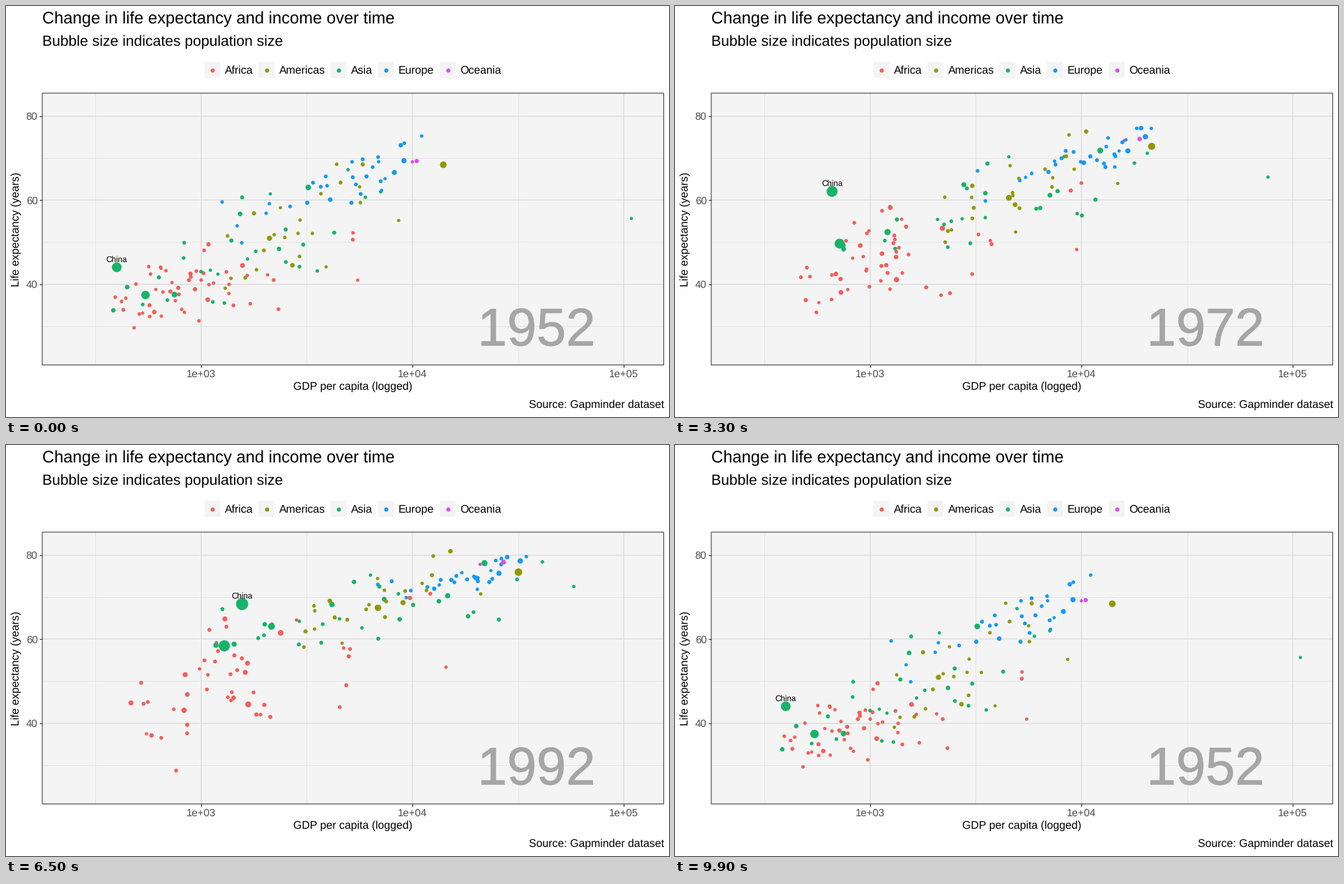
Animation of 951 by 589 pixels, one loop 10000 ms. Source, as a matplotlib script:

```python
import matplotlib.pyplot as plt
import numpy as np
from matplotlib.animation import FuncAnimation
from matplotlib.patches import Rectangle
from matplotlib.patheffects import withStroke

W, H, DPI = 951, 589, 100
PT = 72 / DPI
FRAMES, INTERVAL = 100, 100
plt.rcParams["font.family"] = "Liberation Sans"
plt.rcParams["text.hinting"] = "none"

COLORS = {
    "Africa": "#f35e5a",
    "Americas": "#929705",
    "Asia": "#17b369",
    "Europe": "#149af4",
    "Oceania": "#dc4cf0",
}
PANEL, GREY = "#f4f4f4", "#a6a6a6"

YEARS = np.arange(1952, 2008, 5)
S = np.linspace(0, 1, len(YEARS))
# Frame at which each year is reached; the last entry returns to 1952.
STOPS = (0, 8, 17, 26, 35, 44, 52, 59, 67, 75, 83, 91, 99)

# count, typical population (millions) and its growth, skew, correlation, then
# first and last: mean log10 GDP, its spread, mean life, its spread
CROWD = {
    "Africa": (49, 3, 3.3, .2, .5, (2.99, 3.27), (.28, .37), (39.3, 55), (5, 9)),
    "Americas": (23, 4, 2.7, 0, .65, (3.46, 3.92), (.23, .26), (53, 73.6), (8.5, 3.8)),
    "Asia": (28, 5, 3, 0, .65, (3.2, 3.92), (.33, .44), (47.5, 71.8), (8.5, 5)),
    "Europe": (30, 8, 1.3, -.2, .88, (3.66, 4.37), (.25, .22), (64.4, 77.7), (6, 2.6)),
    "Oceania": (2, 4, 2.2, 0, .9, (4.01, 4.47), (.01, .05), (69.2, 80.7), (.2, .5)),
}

# continent, first and last: population, GDP, life; easing power of the GDP
LANDMARKS = (
    ("Asia", (372, 1110), (547, 2452), (37.4, 64.7), 1.6),
    ("Asia", (86, 127), (3217, 31656), (63, 82.6), .5),
    ("Asia", (82, 224), (750, 3541), (37.5, 70.7), 1.1),
    ("Asia", (.2, 2.5), (108382, 47307), (55.6, 77.6), .8),
    ("Americas", (158, 301), (13990, 42952), (68.4, 78.2), .9),
    ("Americas", (57, 190), (2109, 9066), (50.9, 72.4), .6),
    ("Africa", (33, 135), (1077, 2014), (36.3, 46.9), 1),
    ("Africa", (14, 65), (781, 278), (39.1, 46.5), 2),
)

# Two countries with sudden turns: (year, GDP, life)
RWANDA = ((1952, 493, 40), (1987, 848, 44), (1992, 737, 23.6), (1997, 590, 36), (2007, 863, 46))
CHINA = ((1952, 400, 44), (1957, 576, 50.5), (1962, 488, 44.5), (1967, 613, 58.4),
         (1972, 677, 63.1), (1992, 1656, 68.7), (2002, 3119, 72), (2007, 4959, 73))

rng = np.random.default_rng(52)


def ease(ends, power):
    return ends[0] + (ends[1] - ends[0]) * S ** power


def landmark(cont, pop, gdp, life, power):
    return cont, ease(np.log10(gdp), power), ease(life, .75), ease(np.sqrt(pop), 1)


def keyed(cont, pop, points):
    years, gdp, life = zip(*points)
    x = np.interp(YEARS, years, np.log10(gdp))
    return cont, x, np.interp(YEARS, years, life), ease(np.sqrt(pop), 1)


def drift(n):
    """Standard scores that slowly reshuffle over the years."""
    a, b = rng.normal(size=(2, n))
    a, b = ((v - v.mean()) / v.std() for v in (a, b))
    turn = .7 * S[:, None]
    return np.clip(np.cos(turn) * a + np.sin(turn) * b, -2, 2)


def crowd(cont, n, pop, growth, skew, corr, gdp, gdp_sd, life, life_sd):
    mx, sx = (ease(v, .65)[:, None] for v in (gdp, gdp_sd))
    my, sy = (ease(v, .75)[:, None] for v in (life, life_sd))
    zx, zy = drift(n), drift(n)
    x = mx + sx * (zx + skew * (zx ** 2 - 1) + rng.normal(0, .06, zx.shape))
    y = my + sy * (corr * zx + np.sqrt(1 - corr ** 2) * zy + rng.normal(0, .06, zx.shape))
    pops = np.clip(pop * np.exp(rng.normal(0, 1.1, n)), .1, 55)
    root = np.sqrt(pops) * ease((1, growth ** .5), 1)[:, None]
    return [(cont, *rows) for rows in zip(x.T, np.minimum(y, 81.5).T, root.T)]


def build():
    dots = [dot for item in CROWD.items() for dot in crowd(item[0], *item[1])]
    dots = [dots[i] for i in rng.permutation(len(dots))]
    dots += [landmark(*row) for row in LANDMARKS]
    return dots + [keyed("Africa", (2.5, 8.9), RWANDA), keyed("Asia", (556, 1319), CHINA)]


def px(log_gdp):
    return 279.6 + 303.4 * (log_gdp - 3)


def py(life):
    return 398.5 - 6.02 * (life - 40)


conts, *series = zip(*build())
# One row per year, with the first repeated to close the loop.
xs, ys, roots = (np.vstack([np.transpose(a), np.transpose(a)[:1]]) for a in series)
xs, ys = px(xs), py(ys)
diam = 4.5 + 14.5 * roots / 1319 ** .5

fig = plt.figure(figsize=(W / DPI, H / DPI), dpi=DPI, facecolor="white")
ax = fig.add_axes([0, 0, 1, 1])
ax.set_xlim(0, W)
ax.set_ylim(H, 0)
ax.axis("off")


def label(x, y, s, size, color="black", ha="left", **kw):
    return ax.text(x, y, s, fontsize=size * PT, color=color, ha=ha, va="baseline", **kw)


def line(x, y, color, width, z):
    ax.plot(x, y, color=color, lw=width * PT, zorder=z, solid_capstyle="butt")


def box(x, y, w, h, face, edge="none", z=0):
    ax.add_patch(Rectangle((x, y), w, h, fc=face, ec=edge, lw=1.1 * PT, zorder=z, snap=False))


def draw_panel():
    left, right, top, bottom = 52, 943.4, 124.9, 514.4
    box(left, top, right - left, bottom - top, PANEL)
    for v in (2.5, 3.5, 4.5):
        line([px(v)] * 2, [top, bottom], "#e5e5e5", 1, 1)
    for v in (30, 50, 70):
        line([left, right], [py(v)] * 2, "#e5e5e5", 1, 1)
    for v in (3, 4, 5):
        line([px(v)] * 2, [top, bottom], "#dedede", 1.5, 2)
        line([px(v)] * 2, [bottom, bottom + 4], "#333333", 1.2, 2)
        label(px(v), 532, f"1e+0{v}", 15, "#4d4d4d", "center")
    for v in (40, 60, 80):
        line([left, right], [py(v)] * 2, "#dedede", 1.5, 2)
        line([left - 4, left], [py(v)] * 2, "#333333", 1.2, 2)
        label(45.5, py(v) + 5.4, str(v), 15, "#4d4d4d", "right")
    box(left, top, right - left, bottom - top, "none", "#444444", 6)


def draw_texts():
    label(51.5, 25.5, "Change in life expectancy and income over time", 23.8)
    label(51.5, 57, "Bubble size indicates population size", 21.2)
    label(497.5, 550, "GDP per capita (logged)", 15.9, ha="center")
    label(18.5, 319.5, "Life expectancy (years)", 15.9, ha="center",
          rotation=90, rotation_mode="anchor")
    label(944, 575.5, "Source: Gapminder dataset", 15.9, ha="right")


def draw_legend():
    for x, name in zip((296, 373.5, 477, 545, 633.5), COLORS):
        box(x - 11.5, 80, 23, 23, PANEL)
        ax.scatter(x, 91.5, s=(6 * PT) ** 2, c=COLORS[name], lw=0, zorder=3)
        label(x + 18, 97, name, 15.9)


draw_panel()
draw_texts()
draw_legend()
bubbles = ax.scatter(xs[0], ys[0], c=[COLORS[c] for c in conts], lw=0, zorder=4)
year = label(761, 486.5, "1952", 76, GREY, "center", zorder=5,
             path_effects=[withStroke(linewidth=.8 * PT, foreground=GREY)])
china = label(0, 0, "China", 11.6, ha="center", zorder=5)


def draw(frame):
    t = np.interp(frame, STOPS, range(len(STOPS)))
    i = min(int(t), len(STOPS) - 2)
    f = t - i
    x, y, d = ((1 - f) * a[i] + f * a[i + 1] for a in (xs, ys, diam))
    bubbles.set_offsets(np.column_stack([x, y]))
    bubbles.set_sizes((d * PT) ** 2)
    china.set_position((x[-1], y[-1] - 7.5))
    year.set_text(str(YEARS[int(t + .5) % len(YEARS)]))
    return bubbles, china, year


anim = FuncAnimation(fig, draw, frames=FRAMES, interval=INTERVAL,
                     init_func=lambda: draw(0), repeat=True)
plt.show()
```
